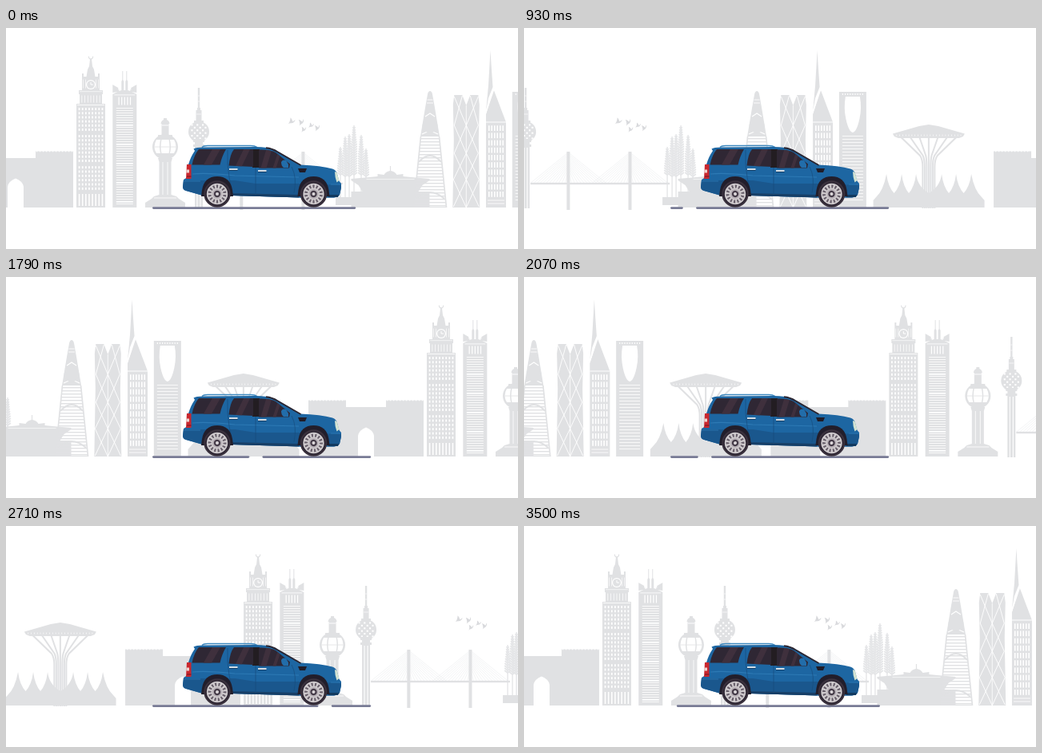
Write an HTML page with a canvas that moves like this. It is 640x277 px and loops after 3.57 s.

```html
<!DOCTYPE html>
<html lang="en">
<head>
<meta charset="utf-8">
<title>City drive</title>
<style>
html, body { margin: 0; width: 100%; height: 100%; overflow: hidden; background: #fff; }
canvas { display: block; width: 640px; height: 277px; }
</style>
</head>
<body>
<canvas id="stage"></canvas>
<script>
const LOOP = 3570, FRAMES = 89, TILE = 886;
const GREY = '#e0e1e3', PALE = '#e5e6e8', WHITE = '#fff';
const W = 640, H = 277;
const cv = document.getElementById('stage');
const dpr = window.devicePixelRatio || 1;
cv.width = W * dpr;
cv.height = H * dpr;
const g = cv.getContext('2d');

function fill(color, d) {
  g.fillStyle = color;
  g.fill(new Path2D(d));
}
function line(color, width, d) {
  g.strokeStyle = color;
  g.lineWidth = width;
  g.stroke(new Path2D(d));
}
function box(color, x, y, w, h) {
  g.fillStyle = color;
  g.fillRect(x, y, w, h);
}
function disc(color, x, y, r) {
  g.fillStyle = color;
  g.beginPath();
  g.arc(x, y, r, 0, 7);
  g.fill();
}
// cols x rows of small panes spread over an area
function panes(color, x, y, w, h, cols, rows, pw, ph) {
  for (let r = 0; r < rows; r++)
    for (let c = 0; c < cols; c++)
      box(color, x + c * w / cols + (w / cols - pw) / 2, y + r * h / rows + (h / rows - ph) / 2, pw, ph);
}
function at(x, draw) {
  g.save();
  g.translate(x, 0);
  draw();
  g.restore();
}

function gate() {
  fill(GREY, 'M-72 225V154.500H-25V163H25V154.500H72V225H10V199Q9 192 0 188.500Q-9 192 -10 199V225Z');
  for (let x = -70; x < 72; x += 4)
    if (Math.abs(x + .5) > 26) box(WHITE, x, 154, 1.2, 1.3);
}

function clockTower() {
  line(GREY, 1.2, 'M-2.500 35.500A2.600 2.600 0 1 0 2.500 35.500');
  fill(GREY, 'M-1 39H1L2 48L4 52L5.500 61H11V78H15V83H14V95H18V225H-18V95H-14V83H-15V78H-11V61H-5.500L-4 52L-2 48Z');
  fill(GREY, 'M-11 61V57H-9V61ZM9 61V57H11V61Z');
  disc(WHITE, 0, 71, 6);
  disc(GREY, 0, 71, 4.8);
  line(WHITE, 1, 'M0 68V71H3');
  panes(WHITE, -11, 63, 6, 14, 2, 1, .6, 11);
  panes(WHITE, 5, 63, 6, 14, 2, 1, .6, 11);
  box(WHITE, -14, 79.5, 28, .6);
  panes(WHITE, -13, 84, 26, 10, 7, 1, .7, 9);
  box(WHITE, -17, 96, 34, .8);
  panes(WHITE, -16.5, 99, 33, 31, 8, 6, 1.7, 3);
  panes(WHITE, -16.5, 133, 33, 36, 8, 7, 1.7, 3);
  panes(WHITE, -16.5, 172, 33, 32, 8, 6, 1.7, 3);
  panes(WHITE, -16.5, 207, 33, 17, 8, 1, 1.5, 15);
}

function hornTower() {
  fill(GREY, 'M-15 225V83L-9 80V78L-7 77V79L-4 78V67L-3 65V54H-2V65L-1 67V78H1V67L2 65V54H3V65L4 67V78L7 79V77L9 78V80L15 83V225Z');
  fill(GREY, 'M-15 71L-8 75V80L-15 81ZM15 71L8 75V80L15 81Z');
  box(WHITE, -13, 83.5, 26, .8);
  panes(WHITE, -9, 86, 18, 11, 5, 1, 1.2, 10);
  for (let y = 100; y < 221; y += 3)
    box(WHITE, -10.5, y, 21, y % 24 < 3 ? 1.6 : .8);
}

function globeTower() {
  fill(GREY, 'M-2 113H2V115Q5 116 5.500 120H4.500V134H9V137H-9V134H-4.500V120H-5.500Q-5 116 -2 115Z');
  box(WHITE, -4.5, 121.5, 9, .9);
  disc(GREY, 0, 149, 16);
  fill(WHITE, 'M-6 140H-11Q-16 149 -11 157H-6Q-8 149 -6 140ZM6 140H11Q16 149 11 157H6Q8 149 6 140ZM-4.500 140H4.500Q6.500 149 4.500 157H-4.500Q-6.500 149 -4.500 140Z');
  line(GREY, .8, 'M-15 149H15');
  fill(GREY, 'M-9 163H9L7.500 168V209L14 211L17 214L25 219V225H-25V219L-17 214L-14 211L-7.500 209V168Z');
  line(WHITE, .8, 'M-3 168V209M3 168V209M-14 213H14');
}

function needleTower() {
  fill(GREY, 'M-1.200 75H1.200V100H2V103H3.500V116H6V119H-6V116H-3.500V103H-2V100H-1.200Z');
  line(WHITE, .6, 'M-3 108H3M-1 85H1M-1 92H1');
  disc(GREY, 0, 130, 13);
  for (let r = 0; r < 6; r++)
    for (let c = -3; c < 3; c++)
      if ((r + c) & 1) box(WHITE, c * 3.4 + .6, 120.4 + r * 3.4, 2.1, 2.1);
  fill(GREY, 'M-7 139H7V143H-7ZM-5 143H5V226H-5ZM-7 146H7V149H-7Z');
  line(WHITE, 1.1, 'M-2 150V226M2 150V226');
}

function bridge() {
  for (const x of [294.3, 371.4]) {
    at(x, () => {
      for (const s of [-1, 1])
        for (let i = 1; i < 13; i++)
          line('#ebecee', .6, `M0 ${180 - i * 2}L${s * i * 3.9} 194`);
      box(GREY, -2, 155, 4, 73);
    });
  }
  box(GREY, 247, 193.8, 174, 2.4);
}

function bird(x, y, s, turn) {
  g.save();
  g.translate(x, y);
  g.rotate(turn);
  g.scale(s, s);
  fill('#d9dadd', 'M-5 3Q-2 1 -1 -5Q1 -3 1.500 .5Q4 -1 5 -2Q4 2 0 2.500Q-3 2 -5 3Z');
  g.restore();
}
function birds() {
  bird(357, 117, .95, -.1);
  bird(369, 118, .9, -.6);
  bird(381.5, 122, .75, -.2);
  bird(389, 125, .85, -.6);
  bird(372, 127, .8, -.4);
}

function tree(x, top) {
  line(GREY, 1.2, `M${x} ${top}V213`);
  for (let y = top + 4, i = 0; y < 186; y += 3, i++) {
    const r = Math.min(3.8, 1.2 + i * .35);
    line(PALE, 1.9, `M${x - r} ${y - 2}L${x} ${y + 1}L${x + r} ${y - 2}`);
  }
}
function grove() {
  [[418, 149], [424, 136], [429, 133], [435, 122], [444, 134], [450, 151]].forEach(t => tree(...t));
  fill(GREY, 'M412 212H449V222H412Z');
}

function lowHall() {
  fill(GREY, 'M-.6 173H.6V179Q6 180 8 184L16 183V186L26 187L49 189V191L40 197L35 205H49V225H-49V205H-35L-40 197L-49 191V189L-26 187L-16 186V183L-8 184Q-6 180 -.6 179Z');
  line(WHITE, .6, 'M-30 189.500H30');
}

function coneTower() {
  fill(GREY, 'M0 79Q2 79 3 83L6 100L12 136H-12L-6 100L-3 83Q-2 79 0 79Z');
  line(WHITE, .8, 'M-3.500 90H3.500M-4 94H4');
  line(WHITE, 1.1, 'M-6 111L0 107L6 111M-10 133Q0 127 10 133');
  disc(GREY, 0, 122, 9.5);
  for (let y = 138; y < 224; y += 4) {
    const w = 12 + (y - 136) * .095;
    box(GREY, -w, y, w * 2, 1.4);
  }
  line(GREY, 1.7, 'M-11.500 136L-20.500 225M11.500 136L20.500 225');
  line(GREY, 2, 'M-14 168Q0 152 14 168M-18 214Q0 198 18 214');
  line(GREY, 1, 'M-21 224.500H21');
}

function latticeTower() {
  fill(GREY, 'M-15 84H-5L0 97L5 84H15L16.500 96L15.500 140L17 225H-17L-15.500 140L-16.500 96Z');
  for (const s of [-1, 1])
    line(WHITE, .9, `M${s * 5} 85L${s * 15} 122L0 157L${s * 16} 190L0 225M${s * 15} 86L0 122L${s * 15} 157L0 190L${s * 16} 224`);
  line(WHITE, .8, 'M0 97V225');
}

function bladeTower() {
  fill(GREY, 'M5.500 28L6.500 45L8.500 74L3 88L0 104L3 72Z');
  fill(GREY, 'M9.500 77L25 118V225H0V108Z');
  line(WHITE, 1.4, 'M10 76L-.5 107');
  line(WHITE, 1, 'M0 118H25');
  panes(WHITE, 2, 121, 21, 92, 6, 10, 1.6, 6.8);
  line(WHITE, .8, 'M2 216H23M2 220H23');
}

function archTower() {
  box(GREY, -17, 80, 34, 145);
  fill(WHITE, 'M-9 86H9Q11.500 100 8.500 114Q5 130 0 131Q-5 130 -8.500 114Q-11.500 100 -9 86Z');
  panes(WHITE, -14, 81.5, 28, 3, 9, 1, 1.2, 1.8);
  for (let y = 135; y < 219; y += 4) box(WHITE, -13, y, 26, .8);
}

function parasol() {
  fill(GREY, 'M0 121L12 123L45 132.500L43 136L38 138H-38L-43 136L-45 132.500L-12 123Z');
  panes(WHITE, -42, 133, 84, 3, 22, 1, .7, 1.8);
  for (let k = -3; k <= 3; k++)
    line(GREY, 2, `M${k * 11.5} 137L${k * 3.6} 160Q${k * 2.5} 165 ${k * 2.5} 174V226`);
}

function tents() {
  const peaks = [-53, -34, -16, 16, 34, 53];
  let d = 'M-69.500 225V216L-66 212Q-57 204 -53 183', last = -53;
  for (const p of peaks.slice(1)) {
    const mid = (p + last) / 2;
    d += `Q${last + 2} 199 ${mid} 207Q${p - 2} 199 ${p} 183`;
    last = p;
  }
  fill(GREY, d + 'Q57 204 66 212L69.500 216V225Z');
}

function skyline() {
  at(12, gate);
  at(106, clockTower);
  at(148.3, hornTower);
  bridge();
  at(199, globeTower);
  at(241, needleTower);
  birds();
  grove();
  at(480.5, lowHall);
  at(530, coneTower);
  at(575.3, latticeTower);
  at(600, bladeTower);
  at(649.8, archTower);
  at(744.8, parasol);
  at(745, tents);
}

// A road stroke whose gap runs round, easing in and out
function road(n) {
  const x0 = 184.4, len = 270.4, gap = 19, s = n % 30 / 30;
  const shift = s * s * (3 - 2 * s) * 266;
  const from = len - gap - shift;
  g.lineCap = 'round';
  const part = (a, b) => {
    if (b - a > .1) line('#787b95', 2.7, `M${x0 + a} 225.600H${x0 + b}`);
  };
  if (from >= 0) {
    part(0, from);
    part(from + gap, len);
  } else {
    part(from + gap, from + len);
  }
  g.lineCap = 'butt';
}

function wheel(x, turn) {
  g.save();
  g.translate(x, 208);
  disc('#3a313d', 0, 0, 16.7);
  disc('#2b2431', 0, 0, 14.6);
  disc('#cfcacd', 0, 0, 13.2);
  g.rotate(turn);
  for (let i = 0; i < 14; i++) {
    g.rotate(Math.PI / 7);
    fill('#655c68', 'M-1.200 -11.400H1.200L.8 -7.500H-.8Z');
  }
  disc('#b9b2b8', 0, 0, 6.2);
  disc('#453b48', 0, 0, 4.2);
  disc('#dcd7da', 0, 0, 2);
  g.restore();
}

const BODY = 'M222 190Q227 188 227 183L228 171Q231 161 236 154L234.500 151.500Q237 149.500 247 149.500L311 149Q328 149 337 153L368 171.500Q394 172.500 408 176.500Q413 178 414 183L416.500 192L419 195V200L417 209Q415 212 410 212.500H368L283 210H246L225 204Q221 203 221 199Z';
const GLASS = [
  'M241 152H275Q270 160 267.500 171.500H232.500Q235 159 241 152Z',
  'M285 152H309V174L278.500 172.500Q280 158 285 152Z',
  'M316 152.500Q330 152 337 156L355 170.500L354 175.500H316Z'
];

function car(n) {
  const turn = n / FRAMES * Math.PI * 16;
  line('#3c88bf', 1.5, 'M245 149.500Q247 147.400 252 147.400H306Q311 147.400 314 149.500');
  fill('#1d66a2', BODY);
  g.save();
  g.clip(new Path2D(BODY));
  fill('#1a578d', 'M220 191H286L312 195H366L420 197V214H220Z');
  fill('#173f67', 'M280 207L366 209V214H280Z');
  line('#2d7ab5', 1.2, 'M233 183Q250 181 286 185L366 187');
  line('#174c7d', .7, 'M277 153Q276 172 279 187L283 208M312 152V209M357 174Q364 187 360 207');
  g.restore();

  // windscreen edge, then side glass
  line('#2b2530', 2, 'M325 150.200Q333 151 339 155L368.500 172');
  fill('#231d22', 'M308 152H317V175H308Z');
  GLASS.forEach(d => {
    fill('#2f2734', d);
    g.save();
    g.clip(new Path2D(d));
    fill('#3f303d', 'M259 150H269L255 175H245ZM298 150H306L293 177H285ZM326 150H333L325 177H318ZM342 150H346L337 177H333Z');
    g.restore();
  });
  fill('#226daa', 'M344 168Q346 164.500 350 166L353 171V175H347Q344 173 344 168Z');
  box('#d3dde5', 279, 176, 10.5, 2);
  box('#123e67', 279, 178, 10.5, 1);
  box('#d3dde5', 315, 178, 10.5, 2);
  box('#123e67', 315, 180, 10.5, 1);
  fill('#201c27', 'M365 176H376L374 181H367Z');

  fill('#c9282f', 'M226 171H231.500V189H225Z');
  box('#ecd2cf', 225.5, 177.5, 3.5, 4);
  box('#9a1f2a', 226, 185, 5.5, 2);
  fill('#d3e3d3', 'M411 180L413.500 181L416.500 191L413.500 193.500Q411 187 411 180Z');
  fill('#123a60', 'M403 209H416L415 212H403Z');
  line('#2872ad', 1, 'M222 192H243M406 196H418');

  for (const x of [264, 384.5]) {
    fill('#221e2b', `M${x - 20} 211L${x - 19} 203Q${x - 16} 186 ${x} 186Q${x + 16} 186 ${x + 19} 203L${x + 20} 211Z`);
    wheel(x, turn);
  }
}

function draw(n) {
  g.setTransform(dpr, 0, 0, dpr, 0, 0);
  box(WHITE, 0, 0, W, H);
  const shift = n * TILE / FRAMES;
  at(-shift, skyline);
  at(TILE - shift, skyline);
  road(n);
  car(n);
}

// 25 drawings a second, shown 14 times a second
let shown = -1;
function tick(now) {
  const t = now % LOOP;
  const step = Math.min(49, Math.floor((t + 5) * .014));
  const n = Math.ceil(step * 25 / 14);
  if (n !== shown) draw(shown = n);
  requestAnimationFrame(tick);
}
draw(0);
requestAnimationFrame(tick);
</script>
</body>
</html>
```
